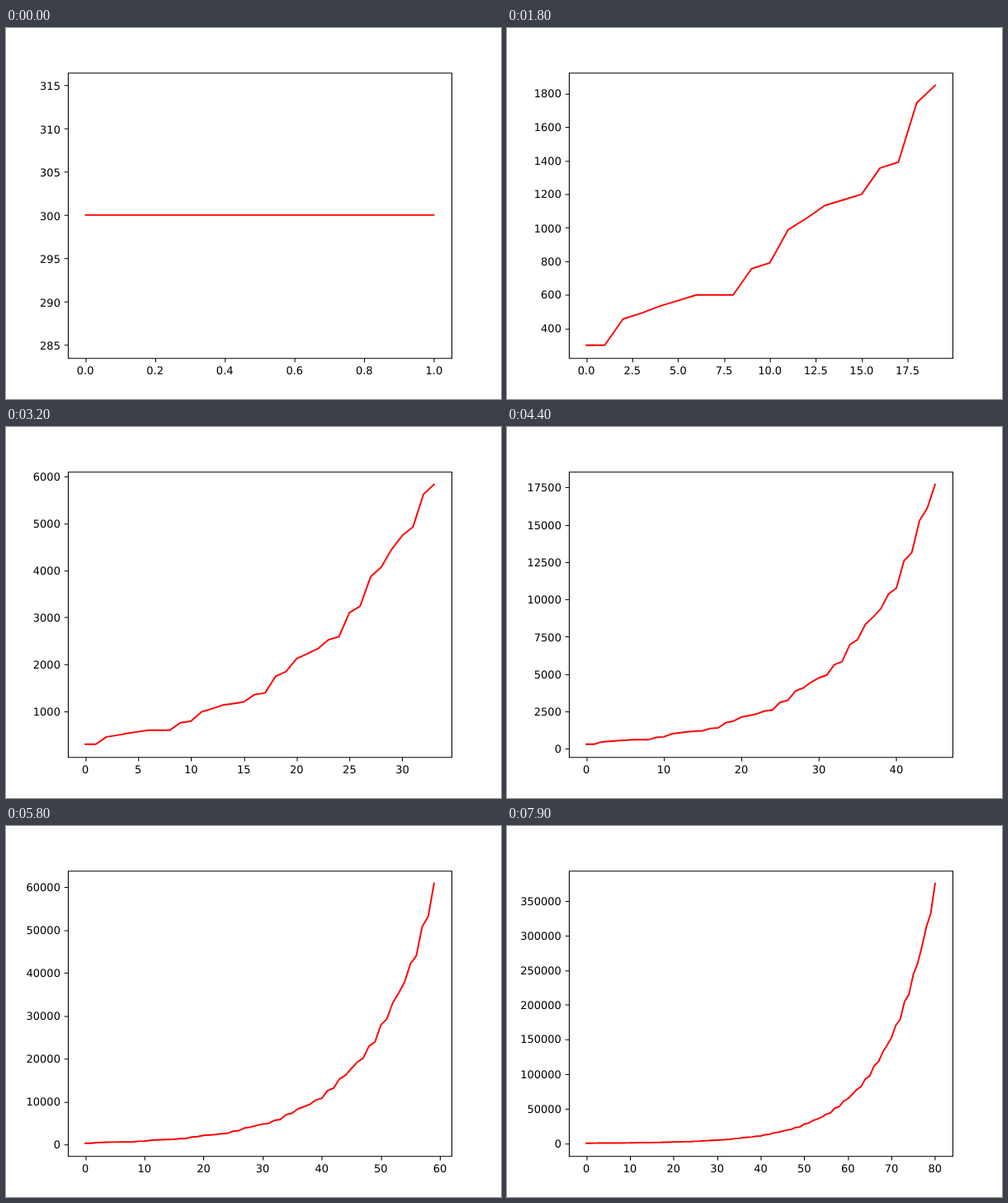
Write an HTML page that moves like this. It is 600 by 450 pixels and loops after 8000 ms.

```html
<!DOCTYPE html>
<html lang="en">
<head>
<meta charset="utf-8">
<title>Population growth</title>
<style>
  html, body { margin: 0; width: 100%; height: 100%; overflow: hidden; background: #fff; }
  svg { display: block; width: 100vw; height: 100vh; }
  text { font: 13.889px "DejaVu Sans", sans-serif; text-rendering: geometricPrecision; }
  .axis { fill: none; stroke: #000; stroke-width: 1.111; }
  .line { fill: none; stroke: #f00; stroke-width: 2.083; stroke-linecap: square; stroke-linejoin: round; }
</style>
</head>
<body>
<svg viewBox="0 0 640 480">
  <g id="labels"></g>
  <path id="line" class="line"/>
  <path id="ticks" class="axis"/>
  <path class="axis" stroke-linecap="square" d="M80.5 58.5H576.5V427.5H80.5Z"/>
</svg>
<script>
const STEP_MS = 100, FRAMES = 80;
const LEFT = 80, RIGHT = 576, TOP = 57.6, BOTTOM = 427.2;
const byId = id => document.getElementById(id);

// Each member reproduces every 7 days; a newborn needs 9 days the first time.
function simulate(days) {
  const births = [0, 0, 156, 35, 42, 33, 34];
  const totals = [300];
  for (let d = 1; d <= days; d++) {
    births[d] ??= births[d - 7] + (births[d - 9] ?? 0);
    totals[d] = totals[d - 1] + births[d];
  }
  return totals;
}

function paddedRange(lo, hi) {
  if (lo === hi) { lo *= 0.95; hi *= 1.05; }
  const pad = (hi - lo) * 0.05;
  return [lo - pad, hi + pad];
}

// Smallest round step giving at most nine intervals.
function tickList([lo, hi]) {
  const raw = (hi - lo) / 9;
  const unit = 10 ** Math.floor(Math.log10(raw));
  const factor = [1, 2, 2.5, 5, 10].find(f => f * unit >= raw);
  const step = factor * unit;
  const decimals = Math.max(0, (factor === 2.5 ? 1 : 0) - Math.floor(Math.log10(step) + 1e-9));
  const list = [];
  for (let i = Math.ceil(lo / step); i * step <= hi; i++) {
    list.push({ value: i * step, label: (i * step).toFixed(decimals) });
  }
  return list;
}

const scale = ([lo, hi], from, to) => v => from + (v - lo) / (hi - lo) * (to - from);
const snap = v => Math.floor(v + 0.5) + 0.5;
const label = (x, y, anchor, str) =>
  `<text x="${x}" y="${y}" text-anchor="${anchor}">${str}</text>`;

const totals = simulate(FRAMES);

function draw(day) {
  const xRange = paddedRange(0, day);
  const yRange = paddedRange(totals[0], totals[day]);
  const px = scale(xRange, LEFT, RIGHT);
  const py = scale(yRange, BOTTOM, TOP);
  const flat = totals[0] === totals[day];
  const fit = v => flat ? Math.round(v) : v.toFixed(3);

  let ticks = "", labels = "";
  for (const t of tickList(xRange)) {
    const x = px(t.value);
    ticks += `M${snap(x)} 427.5v5`;
    labels += label(x, 448, "middle", t.label);
  }
  for (const t of tickList(yRange)) {
    const y = py(t.value);
    ticks += `M80.5 ${snap(y)}h-5`;
    labels += label(70.3, Math.round(y + 5.2), "end", t.label);
  }
  byId("ticks").setAttribute("d", ticks);
  byId("labels").innerHTML = labels;
  byId("line").setAttribute("d", "M" + totals.slice(0, day + 1)
    .map((v, i) => `${fit(px(i))} ${fit(py(v))}`).join("L"));
}

let shown = 0;
function tick() {
  const day = Math.floor(performance.now() / STEP_MS) % FRAMES + 1;
  if (day !== shown) draw(shown = day);
  requestAnimationFrame(tick);
}
tick();
</script>
</body>
</html>
```
